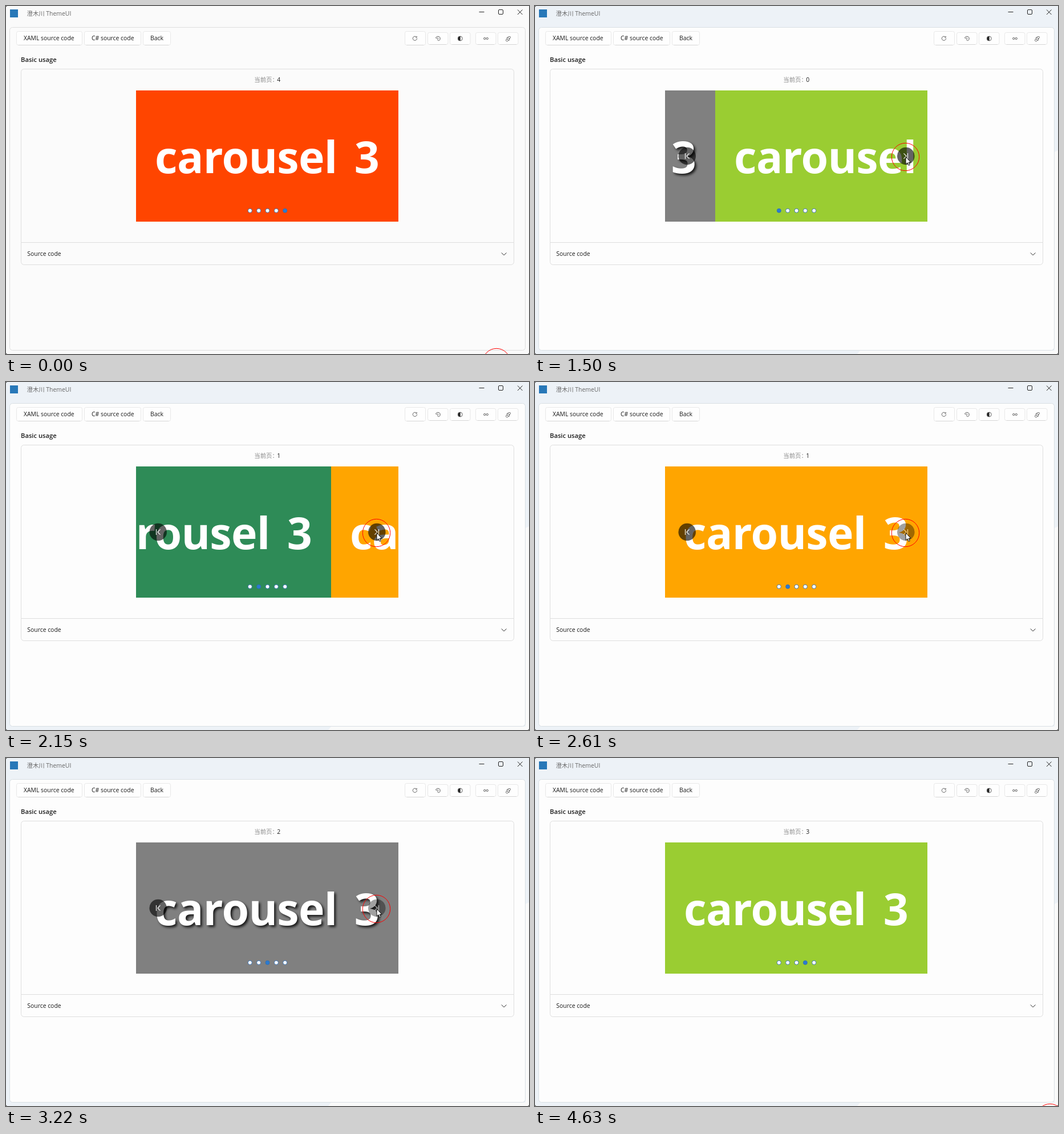
Recreate the animation shown at these times as an HTML page. Size 917 px wide and 610 px high, loop 4740 ms.

```html
<!DOCTYPE html>
<html lang="en">
<head>
<meta charset="utf-8">
<title>Carousel</title>
<style>
html, body { margin: 0; width: 100%; height: 100%; overflow: hidden; background: #fafafa; }
svg { display: block; width: 917px; height: 610px; font: 10.4px "Open Sans", "Noto Sans CJK SC", sans-serif; fill: #1b1b1b; }
.line { fill: none; stroke: #222; }
.icons { fill: none; stroke: #555; stroke-width: .9; }
.panel { fill: none; stroke: #dedede; }
.btn { fill: #fefefe; stroke: #e8e8e8; }
.slide text { font-size: 77px; font-weight: 700; letter-spacing: -.7px; word-spacing: 11px; fill: #fff; }
.shadow { filter: drop-shadow(3px 3px 2px rgba(0, 0, 0, .8)); }
.nav circle { fill: #000; fill-opacity: .61; }
.nav path { fill: none; stroke: #fff; stroke-width: 1.1; }
#card { fill: #fbfbfb; }
#tint { visibility: hidden; fill: #edf2f7; }
.active #tint { visibility: visible; }
.active #card { fill: #fdfdfd; stroke: #d9dfe4; }
</style>
</head>
<body>
<svg id="stage" viewBox="0 0 917 610">
  <defs><clipPath id="view"><rect x="228" y="148" width="460" height="230"/></clipPath></defs>
  <rect width="917" height="610" fill="#fafafa"/>
  <path id="tint" d="M0 0H917V253L911 256V604H570L565 610H0Z"/>
  <path d="M0 0H2L0 2ZM917 610h-2l2-2ZM0 610v-2l2 2Z" fill="#666"/>

  <rect x="7" y="6" width="14" height="14" fill="#2878b8"/>
  <text x="36.5" y="16.5" fill="#666">澄木川 ThemeUI</text>
  <g class="line">
    <path d="M829.5 10.5h9M897 6.5l8.5 8.5M905.5 6.5l-8.5 8.5"/>
    <rect x="863.5" y="6.5" width="8" height="8" rx="1.5"/>
  </g>

  <rect id="card" class="panel" x="6.5" y="37.5" width="904" height="566" rx="5"/>
  <g id="buttons"></g>
  <g class="icons">
    <path d="M719.5 54.3A3.6 3.6 0 1 0 720.5 56.5M720.3 53v2h-2.2"/>
    <path d="M753.5 56c1-4 8-3.5 7.8 1 0 3.5-3.5 4.5-4.3 2.8-.6-1.500 1-2 .2-3-.9-1-2 .6-3.7-.8M756.5 55h1M758.8 56.5h.8"/>
    <circle cx="796.3" cy="57" r="3.9"/>
    <path d="M796.3 53.1a3.9 3.9 0 0 0 0 7.8Z" fill="#222"/>
    <circle cx="839.3" cy="57" r="1.7"/><circle cx="843.7" cy="57" r="1.7"/>
    <rect x="880.5" y="53.5" width="4" height="3" rx="1"/>
    <rect x="876.5" y="58.5" width="4" height="3" rx="1"/>
    <path d="M880.5 55h-2v3.5M880.5 60h2v-3.5"/>
  </g>

  <text x="26" y="98" font-size="11.2" font-weight="600">Basic usage</text>
  <rect class="panel" x="26.5" y="110.5" width="864" height="343" rx="5"/>
  <path class="panel" d="M27 414.5H890"/>
  <text x="435.3" y="133.3" fill="#8a8a8a">当前页：</text>
  <text id="page" x="475.3" y="133.3"></text>
  <text x="37.3" y="438.3">Source code</text>
  <path class="line" d="M868.8 432.5l4.3 4.3 4.3-4.3"/>

  <g clip-path="url(#view)"><g id="strip"></g></g>
  <g id="dots"></g>
  <g id="prev" class="nav"><circle cx="266.7" cy="263" r="15.3"/><path d="M263.5 258v10M270.5 258.3l-4.7 4.7 4.7 4.7"/></g>
  <g id="next" class="nav"><circle cx="650.3" cy="263" r="15.3"/><path d="M653.5 258v10M646.5 258.3l4.7 4.7-4.7 4.7"/></g>

  <g id="mouse">
    <circle r="24.2" fill="none" stroke="#f00"/>
    <path d="M.5 0V13L3.5 10.2L5.7 15L7.7 14.1L5.6 9.5H9.5Z" fill="#fff" stroke="#000" stroke-width=".9"/>
  </g>
</svg>
<script>
const LOOP = 4740, TICK = 50.6, FIRST_TICK = 170;
const WIDTH = 460, SLIDE = 200, HOLD = 155;
const colors = ['seagreen', 'orange', 'gray', 'yellowgreen', 'orangered'];
const releases = [1426, 2092, 2700, 3357];

// Pointer stops: time, x, y
const stops = [
  [170, 860, 624.5], [680, 698, 301], [929, 681, 270.5], [1230, 649.5, 264.5],
  [3810, 649.5, 264.5], [4220, 836, 680], [4425, 850, 622], [4622, 903, 630.5]
];

const el = id => document.getElementById(id);
const clamp = v => Math.max(0, Math.min(1, v));
const place = (id, x, y) => el(id).setAttribute('transform', `translate(${x} ${y})`);

function button(x, y, w, h, label = '') {
  return `<rect class="btn" x="${x}" y="${y}" width="${w}" height="${h}" rx="3"/>` +
    `<path d="M${x + 3} ${y + h}h${w - 6}" stroke="#d6d6d6"/>` +
    `<text x="${x + 12.5}" y="60">${label}</text>`;
}

el('buttons').innerHTML =
  button(18.5, 44.5, 115, 24, 'XAML source code') +
  button(137.5, 44.5, 99, 24, 'C# source code') +
  button(240.5, 44.5, 48, 24, 'Back') +
  button(699.5, 44.5, 36, 24) +
  [739.5, 778.5, 823.5, 862.5].map(x => button(x, 46.5, 35.5, 21)).join('');

el('strip').innerHTML = colors.map((color, i) =>
  `<g class="slide" transform="translate(${228 + i * WIDTH} 148)">
    <rect width="${WIDTH}" height="230" fill="${color}"/>
    <text x="33" y="144.5"${color === 'gray' ? ' class="shadow"' : ''}>carousel 3</text></g>`).join('');

el('dots').innerHTML = colors.map((_, i) =>
  `<circle cx="${427.8 + i * 15.35}" cy="358.7" r="3.5" stroke="#2f6db5" stroke-width=".9"/>`).join('');
const dots = [...el('dots').children];

function pointer(t) {
  const i = stops.findIndex(s => s[0] > t);
  if (i < 1) return stops.at(i).slice(1);
  const [t0, x0, y0] = stops[i - 1], [t1, x1, y1] = stops[i];
  const p = (t - t0) / (t1 - t0);
  return [x0 + (x1 - x0) * p, y0 + (y1 - y0) * p];
}

function draw(time) {
  // The screen refreshes in even ticks
  const t = FIRST_TICK + Math.floor((time - FIRST_TICK) / TICK) * TICK;

  const clicks = releases.filter(r => t >= r).length;
  const pageAfter = n => (n + 4) % colors.length;
  const page = pageAfter(clicks);
  let offset = page;
  if (clicks) {
    const from = pageAfter(clicks - 1);
    offset = from + (page - from) * clamp((t - releases[clicks - 1]) / SLIDE);
  }
  place('strip', -Math.round(offset * WIDTH), 0);
  el('page').textContent = page;
  dots.forEach((dot, i) => dot.setAttribute('fill', i === page ? '#2b7bd0' : '#fff'));

  const pressed = t >= releases[clicks] - HOLD;
  const shown = Math.min(clamp((t - 860) / 200), clamp((4210 - t) / 200));
  el('prev').setAttribute('opacity', shown);
  el('next').setAttribute('opacity', shown * (pressed ? .6 : 1));

  place('mouse', ...pointer(t));
  el('stage').classList.toggle('active', t >= releases[0] - HOLD);
}

const begin = performance.now();
function tick() {
  draw((performance.now() - begin) % LOOP);
  requestAnimationFrame(tick);
}
tick();
</script>
</body>
</html>
```
